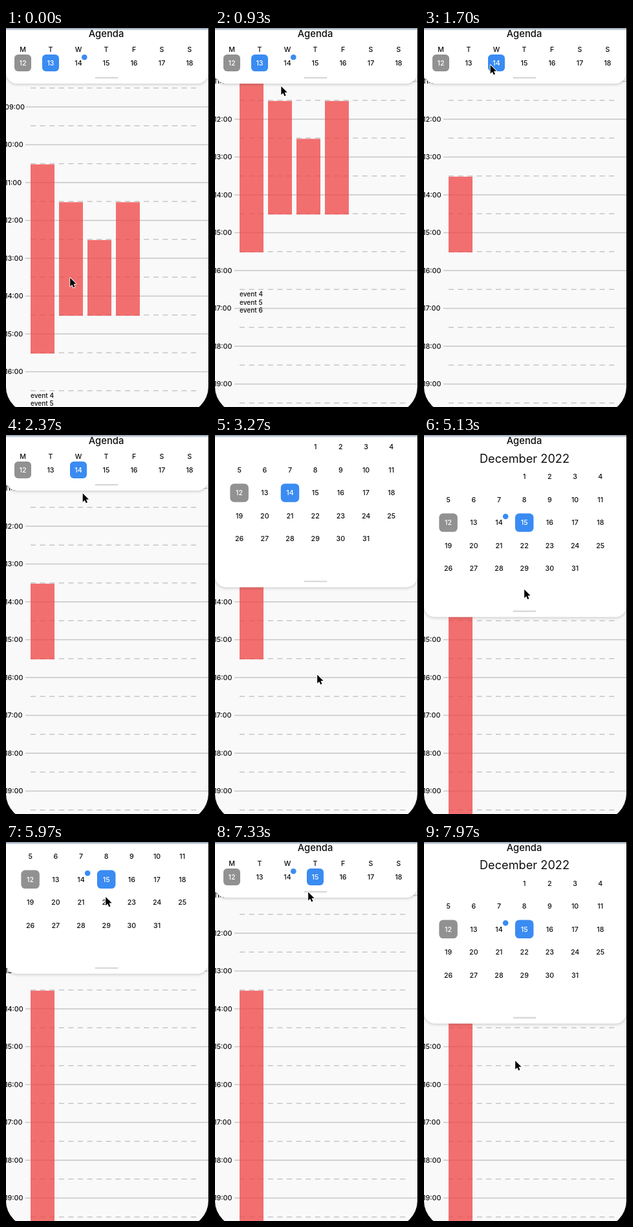
Animation of 314 by 586 pixels, one loop 8000 ms. Source, as an HTML page with a canvas:

```html
<!DOCTYPE html>
<html lang="en">
<head>
<meta charset="utf-8">
<title>Agenda</title>
<style>
  html, body { margin: 0; width: 100%; height: 100%; overflow: hidden; background: #000; }
  canvas { display: block; width: 314px; height: 586px; }
</style>
</head>
<body>
<canvas id="stage"></canvas>
<script>
const W = 314, H = 586, LOOP = 8000;
const HOUR = 58.5, SCROLL = 156.5;
const WEEK_H = 86, TRAVEL = 195.5;
const INK = '#0e0e10', LINE = '#c6c6c6', BLUE = '#3a8bf2', GREY = '#919191';

const canvas = document.getElementById('stage');
const dpr = window.devicePixelRatio || 1;
canvas.width = W * dpr;
canvas.height = H * dpr;
const c = canvas.getContext('2d');

// Events per day, side by side: start hour, end hour
const events = {
  13: [[10.5, 15.5], [11.5, 14.5], [12.5, 14.5], [11.5, 14.5]],
  14: [[13.5, 15.5]],
  15: [[13.5, 21.5]]
};

// Pointer glides: start, end, then the point reached
const glides = [
  [570, 1170, 101.5, 56], [1750, 2350, 117.5, 89], [2400, 2500, 146, 73],
  [2930, 3300, 157, 370], [3917, 4400, 157, 140], [4930, 5570, 152, 300],
  [5730, 6000, 153, 83], [6000, 6530, 92, 64], [6570, 7100, 143, 73.5],
  [7330, 7600, 142, 366], [7750, 7970, 140, 337]
];

const clamp = v => Math.max(0, Math.min(1, v));
const ease = (t, start, length, power = 3) => 1 - (1 - clamp((t - start) / length)) ** power;

function pointerAt(t) {
  let x = 98, y = 385;
  for (const [from, to, nextX, nextY] of glides) {
    const u = ease(t, from, to - from, 2.5);
    x += (nextX - x) * u;
    y += (nextY - y) * u;
  }
  return [x, y];
}

const scrollAt = t => SCROLL * ease(t, 570, 360);
const panelAt = t => ease(t, 3015, 670) - ease(t, 5867, 670) + ease(t, 7405, 670);
const selectedAt = t => t < 1700 ? 13 : t < 4900 ? 14 : 15;

function text(str, x, y, size, { color = INK, align = 'center', weight = 500 } = {}) {
  c.font = `${weight} ${size}px Inter, "Open Sans", sans-serif`;
  c.textAlign = align;
  c.fillStyle = color;
  c.fillText(str, x, y + size * 0.36);
}

function box(x, y, w, h, r, color) {
  c.fillStyle = color;
  c.beginPath();
  c.roundRect(x, y, w, h, r);
  c.fill();
}

function rule(x1, x2, y, dash = []) {
  c.setLineDash(dash);
  c.beginPath();
  c.moveTo(x1, y);
  c.lineTo(x2, y);
  c.stroke();
}

function dayCell(day, x, y, size, selected) {
  const fill = day === selected ? BLUE : day === 12 ? GREY : null;
  if (fill) box(x - size / 2, y - size / 2, size, size, size * 0.22, fill);
  text(day, x, y, 10.7, { color: fill ? '#fff' : INK });
  if (day === 14 && selected !== 14) {
    const d = size * 0.35, r = 4.3;
    box(x + d - r + 0.2, y - d - r + 0.4, r * 2, r * 2, r, BLUE);
  }
}

function timeline(scroll, day) {
  const yOf = h => 122 + (h - 9) * HOUR - scroll;
  c.strokeStyle = LINE;
  c.lineWidth = 1.4;
  for (let h = 8; h < 22; h++) {
    rule(30, 313, yOf(h));
    rule(38, 295, yOf(h + 0.5), [8, 6.6]);
    text(String(h).padStart(2, '0') + ':00', -2, yOf(h), 10.8, { align: 'left' });
  }
  c.fillStyle = 'rgba(241,66,66,.75)';
  events[day].forEach(([from, to], i) =>
    c.fillRect(38 + i * 44, yOf(from) + 1.1, 37, (to - from) * HOUR));
  if (day === 13) {
    for (let i = 0; i < 3; i++) {
      text('event ' + (4 + i), 38, yOf(16.5) + 7.4 + i * 12.4, 10.1, { align: 'left' });
    }
  }
}

const title = () => text('Agenda', 155, 9, 14.8);

function weekView(selected) {
  title();
  [...'MTWTFSS'].forEach((letter, i) => {
    const x = 26 + i * 43;
    text(letter, x, 33, 10.6);
    dayCell(12 + i, x, 54, 26, selected);
  });
}

function monthView(selected) {
  title();
  text('December 2022', 155.5, 36, 18.2, { weight: 400 });
  for (let day = 1; day <= 31; day++) {
    const slot = day + 2;
    dayCell(day, 37.6 + slot % 7 * 39.2, 64.5 + Math.floor(slot / 7) * 35.5, 28.5, selected);
  }
}

function panel(open, selected) {
  const bottom = WEEK_H + TRAVEL * open;
  c.save();
  c.shadowColor = 'rgba(0,0,0,.22)';
  c.shadowBlur = 5 * dpr;
  c.shadowOffsetY = dpr;
  box(0, -60, 313, bottom + 60, 17, '#fff');
  c.restore();

  const week = clamp(1 - open / 0.35);
  c.save();
  c.beginPath();
  c.rect(0, 0, 313, bottom);
  c.clip();
  c.save();
  c.globalAlpha = 1 - week;
  c.translate(0, TRAVEL * (open - 1));
  monthView(selected);
  c.restore();
  c.globalAlpha = week;
  weekView(selected);
  c.restore();
  box(137.5, bottom - 10.2, 36, 2.4, 1.2, '#d9d9d9');
}

function arrow(x, y) {
  c.save();
  c.translate(x + 1.2, y + 1.2);
  c.scale(0.88, 0.88);
  c.beginPath();
  [[0, 0], [0, 15], [3.5, 11.9], [5.8, 17.2], [8.3, 16.1], [6, 10.9], [10.6, 10.6]]
    .forEach(p => c.lineTo(...p));
  c.closePath();
  c.lineJoin = 'round';
  c.lineWidth = 2;
  c.strokeStyle = '#fff';
  c.stroke();
  c.fillStyle = '#000';
  c.fill();
  c.restore();
}

function draw(t) {
  const selected = selectedAt(t);
  c.setTransform(dpr, 0, 0, dpr, 0, 0);
  c.fillStyle = '#000';
  c.fillRect(0, 0, W, H);

  c.save();
  c.beginPath();
  c.roundRect(0, -60, 313, 655, 40);
  c.clip();
  c.fillStyle = '#f9f9f9';
  c.fillRect(0, 0, W, H);
  timeline(scrollAt(t), selected);
  c.setLineDash([]);
  panel(panelAt(t), selected);
  const shade = c.createLinearGradient(0, 0, 0, 4);
  shade.addColorStop(0, 'rgba(92,112,140,.75)');
  shade.addColorStop(1, 'rgba(92,112,140,0)');
  c.fillStyle = shade;
  c.fillRect(0, 0, W, 4);
  c.restore();

  arrow(...pointerAt(t));
}

const start = performance.now();
function tick() {
  draw((performance.now() - start) % LOOP);
  requestAnimationFrame(tick);
}
tick();
</script>
</body>
</html>
```
